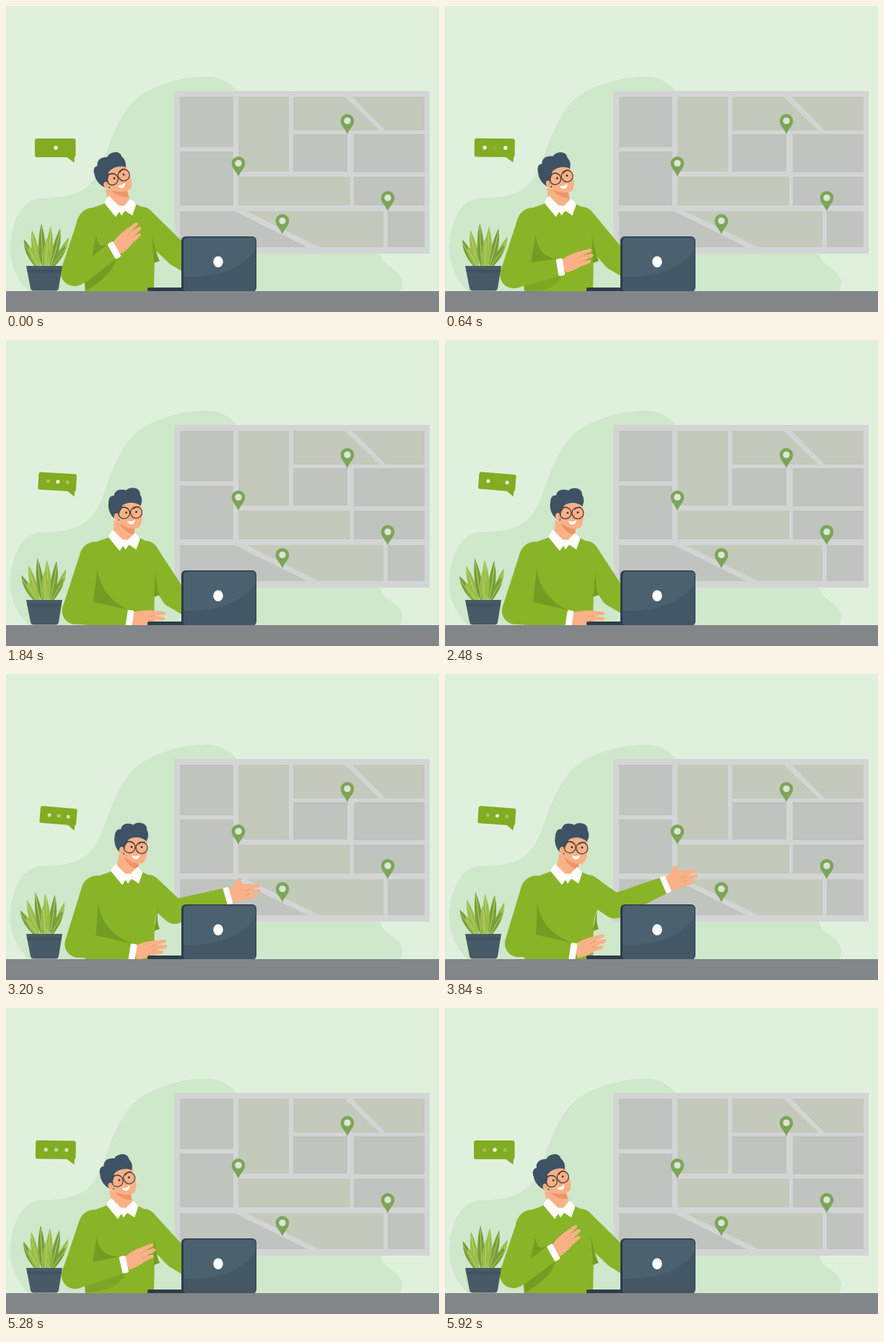
Write an HTML page with a canvas that moves like this. It is 600 px wide and 425 px high and loops after 6 s.

```html
<!DOCTYPE html>
<html lang="en">
<head>
<meta charset="utf-8">
<title>Office scene</title>
<style>
html, body { margin: 0; width: 100%; height: 100%; overflow: hidden; background: #dff1dc; }
canvas { display: block; width: 600px; height: 425px; }
</style>
</head>
<body>
<canvas id="stage" width="600" height="425"></canvas>
<script>
const ctx = document.getElementById('stage').getContext('2d');
const LOOP = 6000, STEP = 80;
const SWEATER = '#8ab427', FOLD = '#739d22', SKIN = '#fab187', SKIN_DARK = '#ee9468';
const HAIR = '#3d5365', NAVY = '#2d3c4a', WHITE = '#fdfdfb';

// Keys are [time, value]; the curve is smooth, cyclic and never overshoots.
function track(...keys) {
  const n = keys.length;
  const key = i => {
    const turn = Math.floor(i / n), k = keys[i - turn * n];
    return [k[0] + turn * LOOP, k[1]];
  };
  const rate = i => {
    const [t0, v0] = key(i), [t1, v1] = key(i + 1);
    return (v1 - v0) / (t1 - t0);
  };
  const slope = i => {
    const a = rate(i - 1), b = rate(i);
    return a * b <= 0 ? 0 : 2 * a * b / (a + b);
  };
  return t => {
    let i = n - 1;
    while (i > 0 && keys[i][0] > t) i--;
    const [t0, v0] = key(i), [t1, v1] = key(i + 1);
    const d = t1 - t0, u = (t - t0) / d, w = 1 - u;
    return v0 * (1 + 2 * u) * w * w + v1 * u * u * (3 - 2 * u)
      + d * (slope(i) * u * w * w - slope(i + 1) * u * u * w);
  };
}

const BEATS = [0, 1280, 2480, 3840, 4480, 5280];
const onBeats = (...vals) => track(...vals.map((v, i) => [BEATS[i], v]));

const pose = {
  lean: onBeats(-7, -3, 0, 3, 1, -4),
  neck: onBeats(153, 158, 163, 167, 164, 157),
  tilt: onBeats(-20, -4, 0, 4, -1, -14),
  lift: onBeats(1, 0, 0, 0, 0, 0.62),
  elbowX: onBeats(95, 96, 98, 102, 100, 96),
  elbowY: onBeats(370, 376, 376, 374, 375, 371),
  wristX: onBeats(147, 167, 169, 174, 173, 160),
  wristY: onBeats(341, 386, 387, 385, 383, 357),
  hand: onBeats(-43, -2, -2, -22, -2, -28),
  farX: track([0, 238], [1280, 232], [2600, 233], [3400, 234], [4480, 236], [5250, 236]),
  farY: track([0, 345], [1280, 355], [2600, 353], [3400, 325], [4480, 321], [5250, 345]),
  reach: track([0, 35], [1280, 35], [2600, 35], [3400, -26], [3840, -23], [4480, -12], [4700, -7], [5250, 35])
};

const rad = deg => deg * Math.PI / 180;

function shape(d, fill) {
  ctx.fillStyle = fill;
  ctx.fill(new Path2D(d));
}
function line(d, color, width) {
  ctx.strokeStyle = color;
  ctx.lineWidth = width;
  ctx.lineCap = ctx.lineJoin = 'round';
  ctx.stroke(new Path2D(d));
}
function dot(x, y, rx, fill, ry = rx) {
  ctx.fillStyle = fill;
  ctx.beginPath();
  ctx.ellipse(x, y, rx, ry, 0, 0, 7);
  ctx.fill();
}
function box(x, y, w, h, fill, r = 0) {
  ctx.fillStyle = fill;
  ctx.beginPath();
  ctx.roundRect(x, y, w, h, r);
  ctx.fill();
}
function placed(x, y, deg, draw) {
  ctx.save();
  ctx.translate(x, y);
  ctx.rotate(rad(deg));
  draw();
  ctx.restore();
}
function limb(x1, y1, r1, x2, y2, r2, fill, roundEnd = true) {
  const a = Math.atan2(y2 - y1, x2 - x1), nx = -Math.sin(a), ny = Math.cos(a);
  dot(x1, y1, r1, fill);
  if (roundEnd) dot(x2, y2, r2, fill);
  shape(`M${x1 + nx * r1},${y1 + ny * r1}L${x2 + nx * r2},${y2 + ny * r2}
    L${x2 - nx * r2},${y2 - ny * r2}L${x1 - nx * r1},${y1 - ny * r1}Z`, fill);
}

function backdrop() {
  box(0, 0, 600, 425, '#dff1dc');
  shape(`M32,397C16,380 6,362 6,338C6,305 20,268 48,267C85,266 108,262 124,238
    C140,212 142,178 170,140C190,113 240,98 280,98C298,99 310,106 322,120L518,340
    C518,362 545,362 549,382Q549,390 546,397Z`, '#cfe7cb');
}

function pin(x, y) {
  shape(`M${x},${y}C${x - 3},${y - 8} ${x - 9.3},${y - 12} ${x - 9.3},${y - 18.6}
    a9.3,9.3 0 0 1 18.6,0C${x + 9.3},${y - 12} ${x + 3},${y - 8} ${x},${y}Z`, '#7ba657');
  dot(x, y - 18.6, 4.7, '#dde4d8');
}

function streetMap() {
  const gray = '#bfc4be', sage = '#c3c9bb';
  box(233.5, 118, 353.5, 226, '#d3d5d5');
  [[241, 126, 74, 70, gray], [322, 126, 70, 104, sage], [398, 126, 182, 47, sage],
   [398, 178, 75, 52, gray], [482, 178, 98, 53, gray], [241, 202, 74, 75, gray],
   [322, 237, 155, 40, sage], [482, 237, 98, 40, gray], [241, 285, 282, 50, sage],
   [529, 285, 51, 50, gray]].forEach(c => box(...c));
  shape('M241,285H316L418,335H241Z', gray);
  shape('M468,125H479L527,174H519Z', '#d3d5d5');
  shape('M315,284H331L436,336H420Z', '#d3d5d5');
  [[473, 178], [322, 237], [383, 317], [529, 285]].forEach(p => pin(...p));
}

function bubble(t, sway) {
  const p = t % 2000 / 2000, q = 0.25;
  const side = p < q ? p / q : Math.sqrt((1 - p) / (1 - q));
  const mid = p < q ? 1 - p / q : (p - q) / (1 - q);
  placed(95, 217, 5 * sway, () => {
    const s = 1 - 0.1 * sway;
    ctx.scale(s, s);
    box(-55, -33, 56.5, 26, '#82ac22', 3);
    shape('M-12,-8L-0.5,0.5L0,-8Z', '#82ac22');
    [side, mid, side].forEach((a, i) => {
      ctx.globalAlpha = a;
      dot(-40.5 + 14.5 * i, -20, 2.8, '#f5f8e6');
    });
  });
}

function leaf(base, x, y, tone) {
  const w = 6, my = 338 + (y - 303) * 0.3, mx = (base + x) / 2 + (x - base) * 0.1;
  shape(`M${base},366Q${mx - w * 1.6},${my} ${x},${y}Q${mx + w * 1.6},${my} ${base},366Z`, tone);
  line(`M${base},364Q${mx},${my} ${x},${y + 5}`, '#c5d982', 0.8);
}

function plant(sway) {
  const dark = '#769f36', light = '#9abd48';
  placed(53, 366, -7.5 * sway, () => {
    ctx.translate(-53, -366);
    [[44, 25, 324, dark], [63, 87, 321, light], [47, 36, 311, light], [61, 75, 309, dark],
     [58, 62, 306, light], [51, 49, 302, dark], [46, 32, 333, light],
     [62, 82, 333, dark], [55, 57, 322, light]].forEach(l => leaf(...l));
  });
  shape('M28,361H78L73,392Q72,395.5 69,395.5H38Q35,395.5 34,392Z', '#495a67');
  shape('M29,366H77L76.5,369Q52,372 29.5,369Z', '#415160');
}

function hand(thumb) {
  const edge = thumb ? 'L9,-13L15,-20Q20,-24 22,-20L20,-13L28,-12' : 'C10,-12 20,-12 28,-11';
  shape(`M0,-9${edge}L44,-9Q48,-6 44,-4.5L31,-4L44,-1.5Q47,2 43,3L29,3L38,5.5
    Q40,9 36,9.5L22,9C14,11 6,10 0,9Z`, SKIN);
  line('M31,-4L23,-3M29,3L23,2.5', SKIN_DARK, 0.8);
}

function cuff(x, y, deg, r) {
  placed(x, y, deg, () => box(-1, -r, 9, 2 * r, WHITE, 2));
}

function farArm(t, lean) {
  const x = pose.farX(t), y = pose.farY(t), deg = pose.reach(t);
  const wx = x + 73 * Math.cos(rad(deg)), wy = y + 73 * Math.sin(rad(deg));
  placed(wx + 5 * Math.cos(rad(deg)), wy + 3 * Math.sin(rad(deg)), deg + 6, () => hand(true));
  cuff(wx, wy, deg, 12);
  limb(195 + lean, 297, 18, x, y, 17, SWEATER);
  limb(x, y, 17, wx, wy, 12, SWEATER, false);
}

function torso(lean) {
  const x = v => v + lean;
  shape(`M${x(150)},271C${x(134)},280 ${x(112)},281 ${x(105)},299L110,397H205L206,345
    L${x(212)},306C${x(213)},286 ${x(196)},278 ${x(183)},274Z`, SWEATER);
  shape(`M${x(209)},318L205,357L213,354Q208,344 ${x(209)},318Z`, FOLD);
}

function nearArm(t, lean) {
  const ex = pose.elbowX(t), ey = pose.elbowY(t), wx = pose.wristX(t), wy = pose.wristY(t);
  const up = pose.lift(t), a = Math.atan2(wy - ey, wx - ex), deg = a * 180 / Math.PI;
  const topX = wx + 12 * Math.sin(a), topY = wy - 12 * Math.cos(a);
  const px = 127 + lean * 0.3;
  if (up > 0.02) {
    ctx.globalAlpha = up;
    shape(`M110,384L${wx + 6},${wy + 10}Q${wx},${wy + 34} 110,396Z`, FOLD);
    ctx.globalAlpha = 1;
  }
  limb(125 + lean * 0.6, 302, 22, ex, ey, 19, SWEATER);
  limb(ex, ey, 19, wx, wy, 12, SWEATER, false);
  shape(`M${px},318L${ex + 24},${ey - 12 - 10 * up}L${topX},${topY}
    Q${px + 6 - 4 * up},${358 - 20 * up} ${px},318Z`, FOLD);
  placed(wx + 7 * Math.cos(a), wy + 7 * Math.sin(a), pose.hand(t), () => hand(false));
  cuff(wx, wy, deg, 12);
}

function head() {
  shape('M-10,-18L17,-8L18,4L5,17L-12,4Z', SKIN);
  shape('M-3,-13L18,-6L17,3Q4,0 -3,-13Z', SKIN_DARK);
  shape('M-8,-40L27,-42C30,-30 30,-13 24,-7C16,-3 2,-8 -5,-17Z', SKIN);
  shape(`M-3,-17C-12,-19 -19,-31 -17,-42C-17,-50 -13,-53 -9,-52C-8,-60 0,-62 8,-59
    C13,-65 28,-63 27,-53C30,-48 30,-42 27,-37C21,-43 8,-43 2,-38Q1,-33 -2,-29Z`, HAIR);
  dot(-6, -23, 4, SKIN, 5);
  line('M-7,-25Q-4,-24 -5,-21', SKIN_DARK, 0.8);
  line('M1,-35Q5,-37 10,-33M17,-33Q21,-37 25,-35', '#5a3a33', 1.5);
  dot(7, -28, 1.5, '#4b3434');
  dot(21, -28.5, 1.5, '#4b3434');
  line('M14,-27Q18,-21 14,-20', SKIN_DARK, 1.2);
  shape('M8,-17Q14,-14 19,-18Q18,-11 13,-11.5Q9,-12 8,-17Z', WHITE);
  ctx.strokeStyle = '#4a4340';
  ctx.lineWidth = 1.3;
  [4, 21].forEach(x => {
    ctx.beginPath();
    ctx.arc(x, -27.7, 8, 0, 7);
    ctx.stroke();
  });
  line('M-4,-28L-9,-29', '#4a4340', 1.2);
}

function collar(lean) {
  placed(lean, 0, 0, () => {
    shape('M150,264Q144,269 143.5,274L159,293L167,281Z', WHITE);
    shape('M180,268Q186,272 187,277L182,291L167,281Z', WHITE);
    shape('M158,277L177,278L167,291Z', WHITE);
  });
}

function laptop() {
  box(196, 391, 54, 5.5, NAVY, 2);
  box(243, 320, 104, 77, NAVY, 6);
  box(246, 321.5, 100, 75, '#4b6170', 5);
  ctx.save();
  ctx.beginPath();
  ctx.roundRect(246, 321.5, 100, 75, 5);
  ctx.clip();
  shape('M244,376C285,378 330,368 348,334V398H244Z', '#435766');
  ctx.restore();
  dot(294, 355.3, 6.8, WHITE, 7.8);
}

function draw(t) {
  const sway = (1 - Math.cos(2 * Math.PI * t / LOOP)) / 2;
  const lean = pose.lean(t);
  backdrop();
  streetMap();
  bubble(t, sway);
  farArm(t, lean);
  torso(lean);
  placed(pose.neck(t), 268, pose.tilt(t), head);
  collar(lean);
  nearArm(t, lean);
  plant(sway);
  laptop();
  box(0, 396, 600, 29, '#838689');
}

const start = performance.now();
function tick(now) {
  const t = Math.max(0, now - start) % LOOP;
  draw(Math.floor(t / STEP) * STEP);
  requestAnimationFrame(tick);
}
draw(0);
requestAnimationFrame(tick);
</script>
</body>
</html>
```
